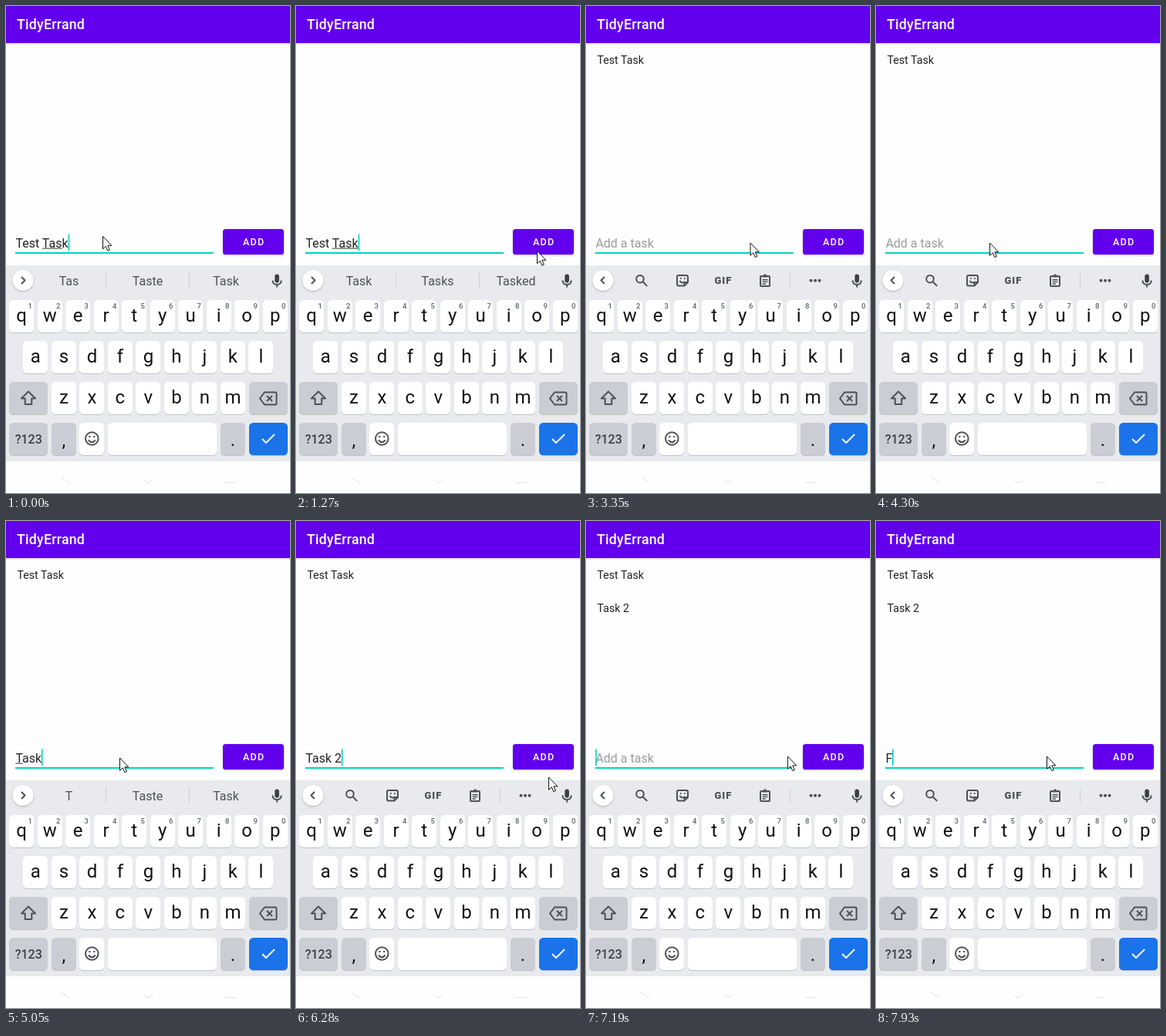
Write an HTML page that moves like this. It is 368 px wide and 631 px high and loops after 8000 ms.

```html
<!DOCTYPE html>
<html lang="en">
<head>
<meta charset="utf-8">
<title>To-do list</title>
<style>
html, body { margin: 0; width: 100%; height: 100%; overflow: hidden; background: #fefefe; }
svg { display: block; width: 100%; height: 100%; font-family: Roboto, sans-serif; }
text { white-space: pre; }
.mid { text-anchor: middle; }
.icon { fill: none; stroke: #4d5156; stroke-width: 2; stroke-linejoin: round; }
.raised { filter: drop-shadow(0 1px 1px rgba(0, 0, 0, .25)); }
</style>
</head>
<body>
<svg id="stage" viewBox="0 0 368 631">
  <defs>
    <linearGradient id="fade" x2="0" y2="1">
      <stop stop-color="#000" stop-opacity=".15"/>
      <stop offset="1" stop-color="#000" stop-opacity="0"/>
    </linearGradient>
    <clipPath id="btnClip"><rect x="281" y="289" width="79" height="33" rx="3.6"/></clipPath>
  </defs>
  <rect width="368" height="631" fill="#fefefe"/>
  <rect y="48" width="368" height="3" fill="url(#fade)"/>
  <rect width="368" height="48" fill="#6200ee"/>
  <text x="14" y="29.5" font-size="17.8" font-weight="500" letter-spacing=".22" fill="#fff">TidyErrand</text>

  <g id="list" font-size="14.2" fill="#222"></g>

  <rect x="12" y="319" width="257" height="2" fill="#03d2c0"/>
  <text id="entry" x="12.4" y="313" font-size="16"></text>
  <rect id="mark" y="313.6" height="1" fill="#333"/>
  <rect id="caret" y="295.5" width="1.6" height="21.5" fill="#03d2c0"/>

  <rect class="raised" x="281" y="289" width="79" height="33" rx="3.6" fill="#6200ee"/>
  <circle id="ripple" clip-path="url(#btnClip)" fill="#fff" opacity=".17"/>
  <text x="307" y="310" font-size="12.5" font-weight="500" letter-spacing="1.3" fill="#fff">ADD</text>

  <rect y="336" width="368" height="254" fill="#e8eaed"/>
  <g id="keys"></g>

  <circle class="raised" cx="22" cy="355.5" r="13.5" fill="#fff"/>
  <path id="chevron" class="icon"/>
  <g id="words" font-size="16" fill="#4d5156" class="mid">
    <path d="M129.5 345v21M237.5 345v21" stroke="#cdd0d4"/>
    <text x="81.5" y="362"></text><text x="183.5" y="362"></text><text x="285" y="362"></text>
  </g>
  <g id="tools">
    <path d="M264.5 346v20" stroke="#cdd0d4"/>
    <g class="icon">
      <circle cx="70" cy="353.7" r="4.8"/><path d="M73.6 357.3l5.6 5.6"/>
      <path d="M120 349h10q2 0 2 2v7l-4.500 4.500h-7.500q-2 0-2-2v-9.500q0-2 2-2zM132 358h-4.500v4.500M121.500 356q2.500 4 6 1.500M122 353h1.600M127 353h1.600"/>
      <path d="M227 350h10q1 0 1 1v11q0 1-1 1h-10q-1 0-1-1v-11q0-1 1-1zM228.500 350.500h7M230.500 348.600h3"/>
      <path d="M228.500 354.800h7M228.500 357.400h7M228.500 360h4.500" stroke-width="1.400"/>
    </g>
    <text class="mid" x="177.900" y="360" font-size="13" font-weight="900" letter-spacing=".9" fill="#4d5156">GIF</text>
    <path d="M291.500 355.800h12" stroke="#4d5156" stroke-width="4" stroke-linecap="round" stroke-dasharray="0 5.500"/>
  </g>
  <rect x="348.300" y="347.500" width="5.600" height="11" rx="2.800" fill="#3c4043"/>
  <path class="icon" d="M345.500 355.500q0 5.500 5.600 5.500t5.600-5.500M351.100 361v3.500"/>

  <path d="M71 611l12 7M284 617.500h14M179 613.500q5 8 11 0" fill="none" stroke="#e2e2e2"/>
  <path id="pointer" d="M0 0V16.300L3.800 12.800L6.300 18.600L8.900 17.500L6.400 11.800H11.400Z" fill="#fff" stroke="#111" stroke-linejoin="round"/>
</svg>
<script>
const LOOP = 8000, STEP = 120, LAG = 250;
const $ = id => document.getElementById(id);

function buildKeys() {
  const PITCH = 36.5, GREY = '#cacdd3', DARK = '#3c4043';
  const rowY = r => 381 + 53 * r;
  const key = (x, r, w, fill = '#fff') => [['#bfc2c6', 1], [fill, 0]].map(([color, dy]) =>
    `<rect x="${Math.round(x)}" y="${rowY(r) + dy}" width="${w}" height="42" rx="5.5" fill="${color}"/>`).join('');
  const label = (s, x, y, size = 24, fill = '#111', weight = 400) =>
    `<text class="mid" x="${x}" y="${y}" font-size="${size}" fill="${fill}" font-weight="${weight}">${s}</text>`;
  let out = '';
  ['qwertyuiop', 'asdfghjkl', 'zxcvbnm'].forEach((letters, r) => [...letters].forEach((ch, i) => {
    const x = 184.4 + (i - (letters.length - 1) / 2) * PITCH;
    out += key(x - 16, r, 32) + label(ch, x, rowY(r) + 28);
    if (!r) out += label((i + 1) % 10, x + 11, rowY(r) + 10.5, 9.5, '#5f6368', 500);
  }));
  for (const x of [59, 278]) out += key(x, 3, 32, GREY);
  for (const r of [2, 3]) out += key(4, r, 50, GREY) + key(315, r, 50, r === 2 ? GREY : '#1a73e8');
  out += key(95, 3, 32) + key(132, 3, 141);
  out += label('?123', 29.2, 566.5, 16, DARK, 500) + label(',', 74.9, 571) + label('.', 293.9, 569.5);
  $('keys').innerHTML = out + `<g class="icon">
    <path d="M29 499.500l9 9h-4.700v7.500h-8.600v-7.500h-4.700z"/>
    <path d="M335 500.500h14q1.500 0 1.500 1.500v13q0 1.500-1.500 1.500h-14l-6-8zM338 505l7 7M345 505l-7 7"/>
    <circle cx="111.300" cy="560.500" r="8.300"/><path d="M106.800 562.500q4.500 5.500 9 0M107.300 558h2.200M113.100 558h2.200"/>
    <path d="M332 561l5 5l11-11" stroke="#fff"/></g>`;
}

// Text in the field: each entry holds from its time until the next
const type = (word, start) => [...word].map((_, i) => [start + i * STEP, word.slice(0, i + 1)]);
const edits = [[-500, 'Test Tas'], [-130, 'Test Task'], [120, 'Test Task'], [1810, ''],
  ...type('Task', 4690), [5300, 'Task '], [5800, 'Task 2'], [6790, ''], [7930, 'F']];
const clicks = [
  { press: 1810, add: 1810, text: 'Test Task' },
  { press: 6540, add: 6790, text: 'Task 2' }
];
// Pointer moves: start time, number of steps, end point
const moves = [[1030, 3, 312.5, 317.5], [2680, 1, 300, 317.5], [2830, 3, 213, 307], [3780, 3, 147.5, 307],
  [5800, 5, 327.5, 332], [6420, 3, 303.5, 305], [6910, 1, 288, 305], [7060, 5, 221.5, 305]];
const vocabulary = ['Taste', 'Task', 'Tasks', 'Tasked'];

const editAt = t => edits.findLast(e => e[0] <= t);
const suggest = word => [word, ...vocabulary.filter(v => v !== word && v.startsWith(word))];
const pointerAt = t => moves.reduce(([x, y], [start, steps, toX, toY]) => {
  const p = t < start ? 0 : Math.min(1, (Math.floor((t - start) / STEP) + 1) / steps);
  return [x + (toX - x) * p, y + (toY - y) * p];
}, [125.5, 298.5]);

const set = (id, attrs) => Object.entries(attrs).forEach(([k, v]) => $(id).setAttribute(k, v));
const show = (id, on) => set(id, { visibility: on ? 'visible' : 'hidden' });
const pen = document.createElement('canvas').getContext('2d');
const measure = s => (pen.font = '16px Roboto, sans-serif', pen.measureText(s).width);

function render(t) {
  const [edited, text] = editAt(t);
  $('entry').textContent = text || 'Add a task';
  set('entry', { fill: text ? '#222' : '#9b9b9b' });
  set('caret', { x: 12.2 + measure(text) });
  show('caret', (t - edited) % 1000 < 490);

  // The keyboard reacts a little after the typing
  const [word = ''] = editAt(t - LAG)[1].match(/[a-z]+$/i) || [];
  const from = text.lastIndexOf(word);
  set('mark', { x: 12.4 + measure(text.slice(0, Math.max(from, 0))), width: from < 0 ? 0 : measure(word) });
  show('words', word);
  show('tools', !word);
  const options = suggest(word);
  document.querySelectorAll('#words text').forEach((el, i) => el.textContent = options[i]);
  set('chevron', { d: word ? 'M20 351l4.5 4.5l-4.5 4.5' : 'M24 351l-4.5 4.5l4.5 4.5' });

  const [x, y] = pointerAt(t);
  set('pointer', { transform: `translate(${x} ${y})` });

  clicks.forEach((c, i) => show('item' + i, t >= c.add));
  const click = clicks.find(c => t >= c.press && t < c.add + STEP);
  show('ripple', click);
  if (click) set('ripple', { cx: x, cy: y, r: 28 + (t - click.press) * 0.3 });
}

buildKeys();
$('list').innerHTML = clicks.map((c, i) => `<text id="item${i}" x="14.5" y="${75 + 43 * i}">${c.text}</text>`).join('');
const start = performance.now();
function tick() {
  render((performance.now() - start) % LOOP);
  requestAnimationFrame(tick);
}
tick();
</script>
</body>
</html>
```
